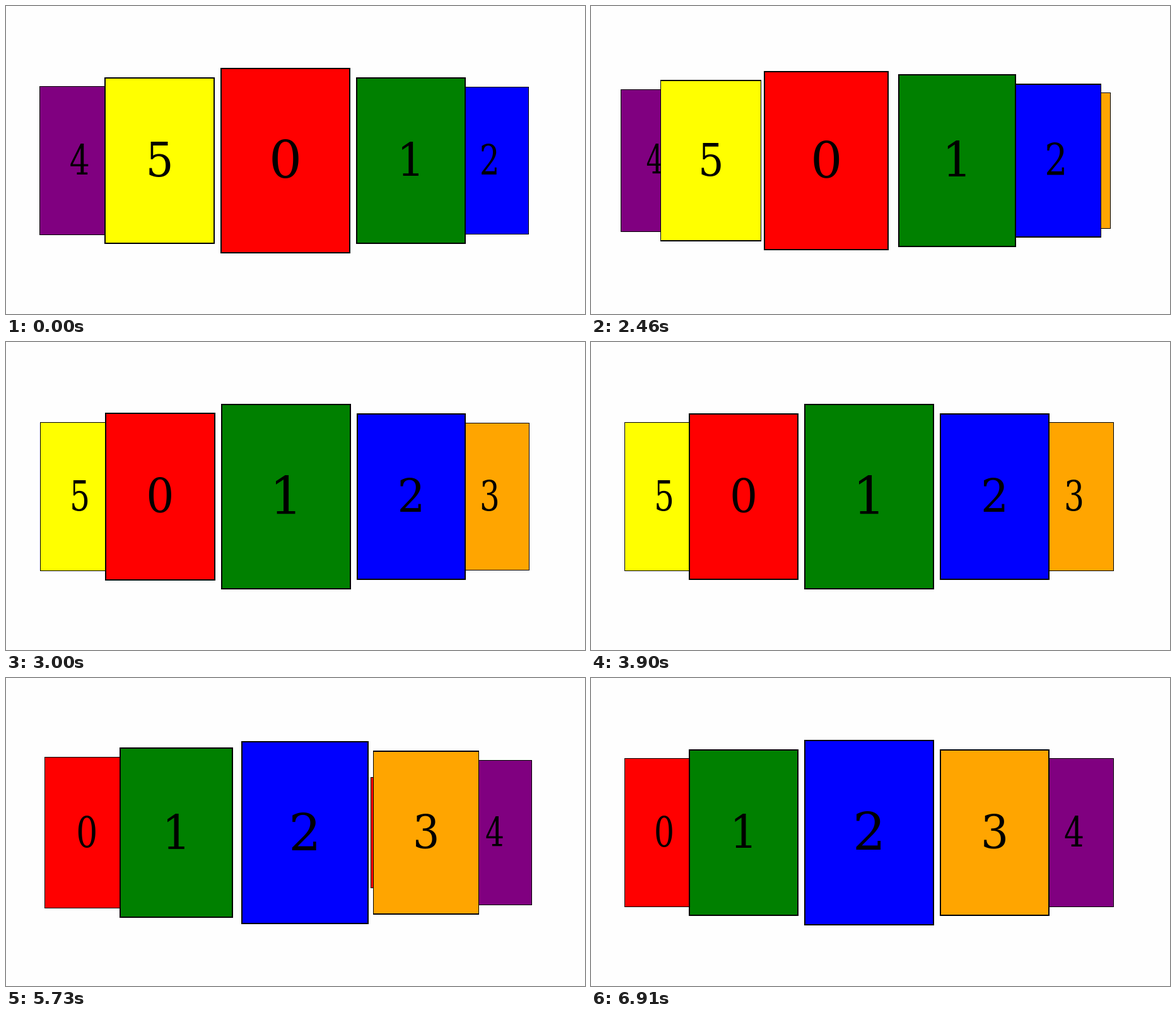
Write an HTML page with a canvas that moves like this. It is 918 by 488 pixels and loops after 8000 ms.

```html
<!DOCTYPE html>
<html lang="en">
<head>
<meta charset="utf-8">
<title>Card carousel</title>
<style>
  html, body { margin: 0; width: 100%; height: 100%; overflow: hidden; background: #fefefe; }
  canvas { display: block; }
</style>
</head>
<body>
<canvas id="stage" width="918" height="488"></canvas>
<script>
const ctx = document.getElementById('stage').getContext('2d');

const LOOP = 8000;
const SLIDE = 960;
const STARTS = [-835, 2189, 5191];
const COLORS = ['red', 'green', 'blue', 'orange', 'purple', 'yellow'];
const CENTER = { x: 441, y: 245 };
const CARD = { w: 206, h: 294, border: 2, font: 82, baseline: 28 };
const TURN = Math.PI / 9;

const bezier = (a, b, s) => 3 * a * s * (1 - s) ** 2 + 3 * b * s * s * (1 - s) + s ** 3;

// cubic-bezier(.4, 0, .2, 1)
function ease(t) {
  if (t <= 0) return 0;
  if (t >= 1) return 1;
  let lo = 0, hi = 1;
  for (let i = 0; i < 30; i++) {
    const mid = (lo + hi) / 2;
    if (bezier(0.4, 0.2, mid) < t) lo = mid; else hi = mid;
  }
  return bezier(0, 1, lo);
}

// Horizontal distance from the middle for a card u places away
const offset = u => u * (211.6 - 12.75 * u ** 2 + 0.117 * u ** 4);

const lineWidth = scale => Math.max(1, Math.floor(CARD.border * scale + 0.35));

function drawCard(index, u, dx = offset(u)) {
  const sy = 1 - 0.1 * Math.abs(u);
  const sx = sy * Math.cos(u * TURN);
  const x = CENTER.x + dx;
  const left = Math.round(x - CARD.w * sx / 2);
  const right = Math.round(x + CARD.w * sx / 2);
  const top = Math.round(CENTER.y - CARD.h * sy / 2);
  const bottom = Math.round(CENTER.y + CARD.h * sy / 2);
  const bx = lineWidth(sx), by = lineWidth(sy);

  ctx.fillStyle = '#000';
  ctx.fillRect(left, top, right - left, bottom - top);
  ctx.fillStyle = COLORS[index];
  ctx.fillRect(left + bx, top + by, right - left - 2 * bx, bottom - top - 2 * by);

  ctx.save();
  ctx.translate(x, CENTER.y);
  ctx.scale(sx, sy);
  ctx.fillStyle = '#000';
  ctx.fillText(index, 0, CARD.baseline);
  ctx.restore();
}

function draw(t) {
  const pos = STARTS.reduce((sum, start) => sum + ease((t - start) / SLIDE), -1);
  const middle = Math.round(pos);
  const cardAt = n => ((n % 6) + 6) % 6;

  ctx.fillStyle = '#fefefe';
  ctx.fillRect(0, 0, 918, 488);
  ctx.font = `${CARD.font}px "DejaVu Serif", serif`;
  ctx.textAlign = 'center';

  // The next card waits at the back while the row settles
  if (middle > pos) drawCard(cardAt(middle + 4), 4, 148);

  const row = [];
  for (let n = middle - 3; n <= middle + 3; n++) row.push({ n, u: n - pos });
  row.sort((a, b) => Math.abs(b.u) - Math.abs(a.u));
  for (const { n, u } of row) drawCard(cardAt(n), u);
}

const begin = performance.now();
function tick() {
  draw((performance.now() - begin) % LOOP);
  requestAnimationFrame(tick);
}
tick();
</script>
</body>
</html>
```
